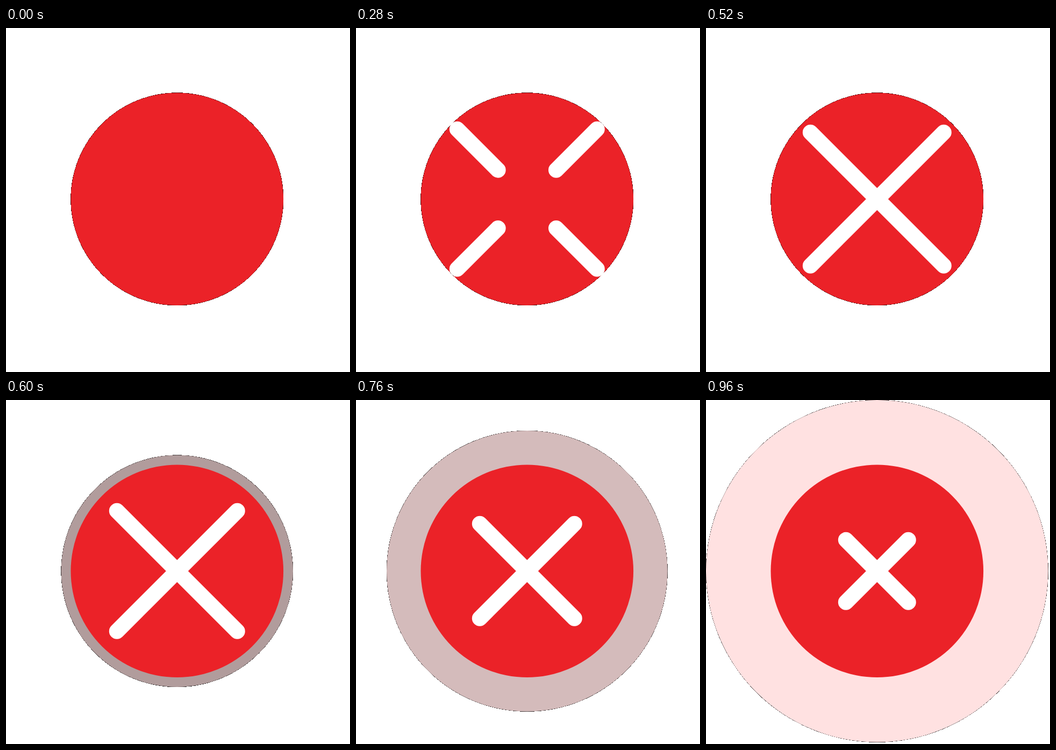
Animation of 640 by 640 pixels, one loop 1.64 s. Source, as an HTML page:

```html
<!DOCTYPE html>
<html lang="en">
<head>
<meta charset="utf-8">
<title>Error cross</title>
<style>
  html, body { margin: 0; width: 100%; height: 100%; overflow: hidden; background: #fff; }
  svg { display: block; width: 100%; height: 100%; }
</style>
</head>
<body>
<svg viewBox="0 0 640 640">
  <g transform="translate(318.3 318.3)">
    <circle id="rim" fill="#000" shape-rendering="crispEdges"/>
    <circle id="halo"/>
    <circle r="197.8" fill="#eb2228"/>
    <path id="cross" fill="none" stroke="#fff" stroke-width="29" stroke-linecap="round"/>
  </g>
</svg>
<script>
const LOOP = 1640, STEP = 40;
const DRAWN = 480, HALO_START = 560, END = 960;
const DISC_R = 197.8, HALO_R = 318.3, RIM = 0.3;
const CORNERS = [[-1, -1], [1, -1], [1, 1], [-1, 1]];
const [rim, halo, cross] =
  ["rim", "halo", "cross"].map(id => document.getElementById(id));

const clamp01 = x => Math.min(1, Math.max(0, x));
const lerp = (a, b, p) => a + (b - a) * p;

function drawCross(t) {
  const outer = lerp(130, 58, clamp01((t - DRAWN) / (END - DRAWN)));
  const inner = lerp(130, 0, clamp01(t / DRAWN));
  const arm = ([x, y]) => `M${x * outer} ${y * outer}L${x * inner} ${y * inner}`;
  cross.setAttribute("d", t > 0 ? CORNERS.map(arm).join("") : "");
}

function drawHalo(t) {
  const left = Math.max(0, END - t);
  const r = t < HALO_START ? 0 : HALO_R - 0.285 * left;
  const light = 1 - 0.00085 * left;
  const [red, other] = [255, 225].map(v => Math.round(v * light));
  halo.setAttribute("r", r);
  halo.setAttribute("fill", `rgb(${red},${other},${other})`);
  // A hard-edged dark disc shows through the soft edge of the outermost circle.
  rim.setAttribute("r", Math.max(r, DISC_R) + RIM);
}

function render(time) {
  const t = Math.floor((time % LOOP) / STEP) * STEP;
  drawHalo(t);
  drawCross(t);
}

const start = performance.now();
function tick() {
  render(performance.now() - start);
  requestAnimationFrame(tick);
}
tick();
</script>
</body>
</html>
```
